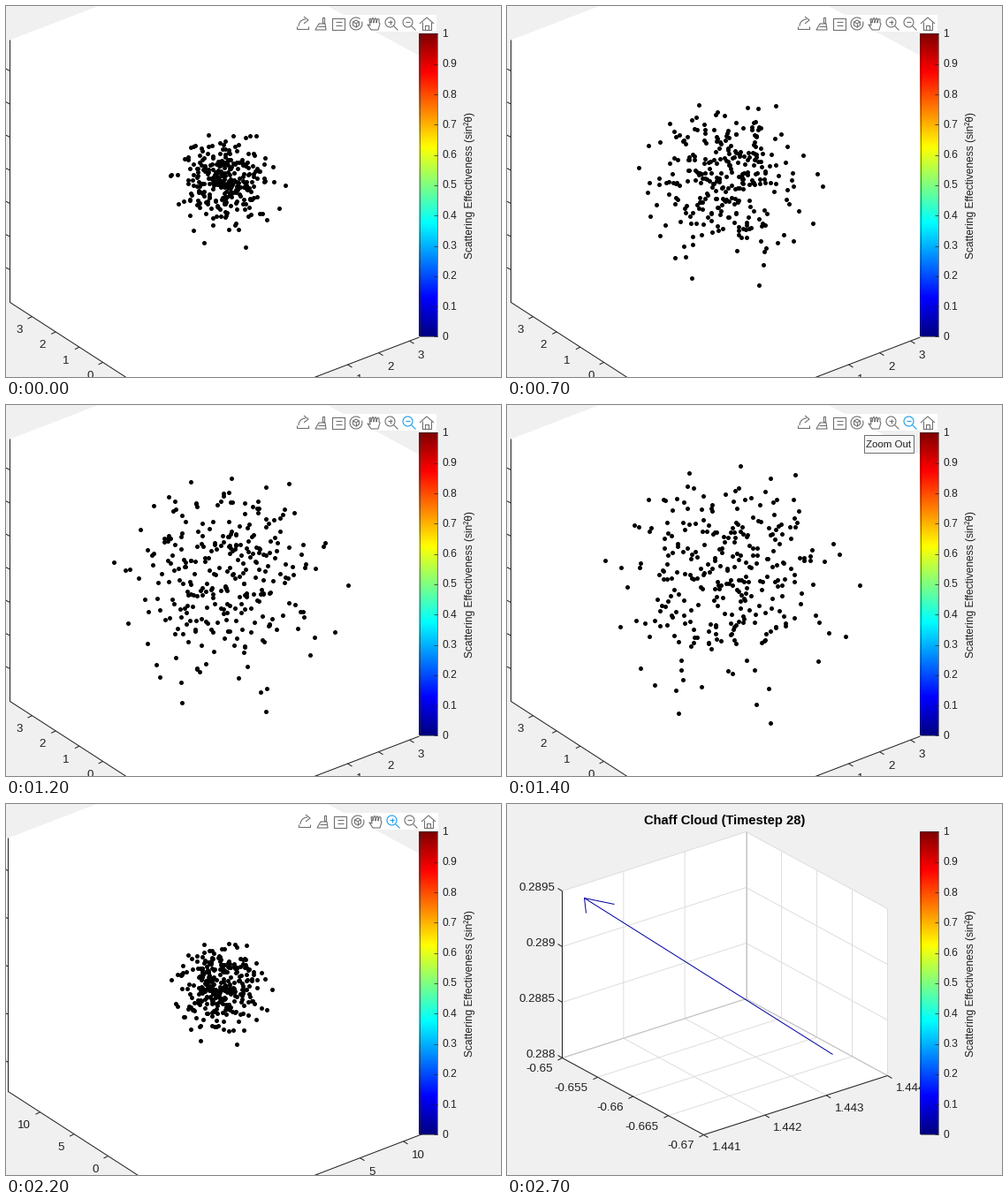
A matplotlib script that plays this animation: 560x420 px, repeating every 2800 ms.

```python
import matplotlib.pyplot as plt
import numpy as np
from matplotlib.animation import FuncAnimation
from matplotlib.collections import LineCollection
from matplotlib.patches import Polygon, Rectangle

W, H, FRAMES, STEP = 560, 420, 28, 100
PT = 0.72  # points per pixel at 100 dpi
INK, GRAY, HOT = "#202020", "#707070", "#1c9cea"
HOVER, TIP, ZOOM_OUT, MOVE, ZOOM_IN, LAST = 12, 13, 16, 20, 24, 27

plt.rcParams["font.family"] = "Liberation Sans"
fig = plt.figure(figsize=(W / 100, H / 100), dpi=100, facecolor="#f0f0f0")
ax = fig.add_axes([0, 0, 1, 1])
ax.axis("off")


def fill(points):
    return ax.add_patch(Polygon(points, fc="white", ec="none", zorder=0))


def lines(segments, color=INK, z=2, width=1.0):
    group = LineCollection(segments, colors=color, linewidths=width * PT, zorder=z)
    return ax.add_collection(group)


def label(x, y, text, ha="center", size=13.33, z=2, color=INK, **style):
    return ax.text(x, y, text, ha=ha, va="center", fontsize=size * PT,
                   color=color, zorder=z, clip_on=True, **style)


def tick(point, dx, dy):
    return [point, (point[0] + dx, point[1] + dy)]


def y_mark(point, text, pad=13):
    x, y = point
    return tick(point, -5, 2.5), label(x - 11, y + pad, text, "right")


def x_mark(point, text, pad=15):
    x, y = point
    return tick(point, 5, 3), label(x + 9.5, y + pad, text, "left")


def close_view(left, base, right, z_ticks, y_ticks, x_ticks, top, step):
    """Zoomed axes; each tick range is given as (first place, spacing)."""
    wall, roof, floor, rim = 38, 0.385, 0.646, 0.383

    def floor_left(x):
        return x, base + floor * (x - left)

    def floor_right(x):
        return x, 374.5 - rim * (x - 467)

    low_l = (left + (H - base) / floor, H)
    low_r = (467 - (H - 374.5) / rim, H)
    edge_r = floor_right(right)
    outline = [(left + wall / roof, 0), (left, wall), (left, base), low_l, low_r,
               edge_r, (right, 0.54 * (right - 364)), (364, 0)]
    segs = [[(left, wall), (left, base), low_l], [low_r, edge_r]]
    segs += [tick((left, y), -6, -3) for y in np.arange(z_ticks[0], base, z_ticks[1])]
    marks = []
    for i in range(4):
        text = str(top - step * i)
        marks.append(y_mark(floor_left(y_ticks[0] + y_ticks[1] * i), text, 15.5))
        marks.append(x_mark(floor_right(x_ticks[0] - x_ticks[1] * i), text, 16.5))
    segs += [seg for seg, _ in marks]
    return [fill(outline), lines(segs)] + [text for _, text in marks]


def full_view():
    back, left, front, right = np.array([(270, 220), (62, 287), (222, 374), (430, 307)])
    up = np.array([0, -189])
    grid, ticks, texts = [], [], []

    def add(mark):
        ticks.append(mark[0])
        texts.append(mark[1])

    for i, f in enumerate(np.linspace(0, 1, 4)):
        rise, p, q = up * f, left + (back - left) * f, front + (right - front) * f
        grid.extend([[left + rise, back + rise, right + rise], [p + up, p, q]])
        ticks.append(tick(left + rise, -5, -3))
        texts.append(label(54, 284 - 63 * i, f"{0.288 + 0.0005 * i:.4g}", "right"))
        add(x_mark(q, f"{1.441 + 0.001 * i:.3f}"))
    for i, f in enumerate(np.linspace(0, 1, 5)):
        p, q = left + (front - left) * f, back + (right - back) * f
        grid.append([q + up, q, p])
        add(y_mark(p, f"{-0.65 - 0.005 * i:.3g}"))

    tail, head = (368, 283), (87, 106)
    return texts + [
        fill([left, left + up, back + up, right + up, right, front]),
        lines(grid, "#dedede", 1),
        lines([[back + up, back], [left, back, right]], "#c4c4c4", 1),
        lines([[left + up, left, front, right]] + ticks),
        lines([[tail, head], [(121, 113), head, (89, 123)]], "#0000a0", 3),
        label(246, 19, "Chaff Cloud (Timestep 28)", size=14.7, weight="bold",
              color="black"),
    ]


def color_bar():
    level = np.linspace(0, 1, 256)[:, None, None]
    jet = np.clip(1.5 - abs(4 * level - np.array([3, 2, 1])), 0, 1)
    ax.imshow(jet, aspect="auto", extent=(466.5, 487.5, 374, 31), origin="lower", zorder=6)
    ax.add_patch(Rectangle((467, 31), 20, 343, fill=False, ec=INK, lw=0.4, zorder=7))
    ys = 374 - 34.3 * np.arange(11)
    lines([tick((487, y), -4, 0) for y in ys], INK, 7, 0.7)
    for i, y in enumerate(ys):
        label(492.5, y + 0.5, f"{i / 10:g}", "left", 12)
    label(523.7, 202.5, "Scattering Effectiveness (sin²θ)", size=12, rotation=90)


def arc(r, start=0, end=360, x=0, y=0):
    a = np.radians(np.linspace(start, end, 25))
    return np.column_stack([x + r * np.cos(a), y + r * np.sin(a)])


def box(l, t, r, b):
    return [(l, t), (r, t), (r, b), (l, b), (l, t)]


def toolbar_icons():
    """Strokes of each button, relative to its centre."""
    export = [[(-7, 3), (-7, 6), (6, 6), (6, 3)], arc(8, 180, 270, 3, 3),
              [(1, -8), (6, -4), (1, 0)]]
    brush = [box(2, -7, 4, -1), [(-2, 0), (5, 0), (6, 7), (-6, 7), (-2, 0)], [(-3, 3), (5, 3)]]
    note = [box(-7, -6, 7, 7)] + [[(-3, y), (4, y)] for y in (-2, 2)]
    orbit = [arc(7, -20, 310), arc(4, 30, 390)[::4], [(-3, -2), (0, 0), (3, -2)], [(0, 0), (0, 4)]]
    fingers = [p for x in (-4, -1, 2, 5)
               for p in [(x - 1, -5), (x, -7 + abs(x) / 3), (x + 1, -5), (x + 1, -1)]]
    hand = [[(-3, 7), (-7, 1), (-4, 2)] + fingers + [(7, 0), (5, 7), (-3, 7)]]
    zoom_out = [arc(5.5, x=-1.5, y=-1.5), [(2.5, 2.5), (7.5, 7.5)], [(-4, -1.5), (1, -1.5)]]
    zoom_in = zoom_out + [[(-1.5, -4), (-1.5, 1)]]
    home = [[(-8, 0), (0, -7), (8, 0)], [(-5, -2), (-5, 7), (5, 7), (5, -2)], box(-2, 2, 2, 7)]
    return [export, brush, note, orbit, hand, zoom_in, zoom_out, home]


PLUS, MINUS = 5, 6
STROKES = [(i, np.array(path) + (335.5 + 20 * i, 19.5))
           for i, icon in enumerate(toolbar_icons()) for path in icon]

# Each particle starts in a compact cloud, keeps a drift and is jostled each step.
NEAR, FAR, RATIO = np.array([248, 202]), np.array([241, 209]), 3.3
CORE, RING = 285, 14
rng = np.random.default_rng(7)
start = rng.normal(0, 24, (CORE, 2))
drift = rng.normal(0, 2.2, (CORE, 2))
walk = np.cumsum(rng.normal(0, 9.5, (FRAMES, CORE, 2)), axis=0)
walk -= walk[0].copy()
angle = 2 * np.pi * np.arange(RING) / RING + rng.uniform(-0.2, 0.2, RING)
spread = rng.uniform(0.78, 1.06, RING)
heading = np.column_stack([np.cos(angle), np.sin(angle)]) * spread[:, None]


def cloud(n):
    """Offsets from the cloud's centre in near-view pixels."""
    core = start + drift * n + walk[n]
    reach = np.hypot(*core.T)[:, None] / (72 + 6 * n)
    core = core / (1 + reach ** 4) ** 0.25
    return np.vstack([core, heading * (70 + 6.2 * n)])


views = {
    "near": close_view(4, 335, 467, (73, 37.5), (29, 26.7), (456, 35), 3, 1),
    "far": close_view(2, 325, 470, (75, 54.2), (38, 38.5), (449, 49), 10, 5),
    "full": full_view(),
}
color_bar()
dots, = ax.plot([], [], "o", ms=5 * PT, mew=0, color="black", zorder=3)
bar = ax.add_patch(Rectangle((326.5, 10), 160, 19, fc="white", ec="none", zorder=4))
icons = lines([], GRAY, 5, 1.1)
tip = [ax.add_patch(Rectangle((403, 34), 56, 20, fc="#f8f8f8", ec="#707070", lw=PT, zorder=8)),
       label(431, 45, "Zoom Out", size=11.5, z=9)]
ax.set_xlim(-0.5, W - 0.5)
ax.set_ylim(H - 0.5, -0.5)


def update(n):
    view = "full" if n == LAST else "far" if ZOOM_OUT <= n < ZOOM_IN else "near"
    for name, parts in views.items():
        for part in parts:
            part.set_visible(name == view)
    for part in (dots, bar, icons):
        part.set_visible(view != "full")
    for part in tip:
        part.set_visible(TIP <= n < ZOOM_OUT)

    offsets = cloud(n)
    points = FAR + offsets / RATIO if view == "far" else NEAR + offsets
    dots.set_data(*points.T)

    shift = 2 if view == "far" else 0
    hot = None if n < HOVER else MINUS if n < MOVE else PLUS
    bar.set_x(326.5 + shift)
    icons.set_segments([path + (shift, 0) for _, path in STROKES])
    icons.set_color([HOT if i == hot else GRAY for i, _ in STROKES])
    return []


anim = FuncAnimation(fig, update, frames=FRAMES, interval=STEP, repeat=True,
                     repeat_delay=0, init_func=lambda: update(0))
plt.show()
```
